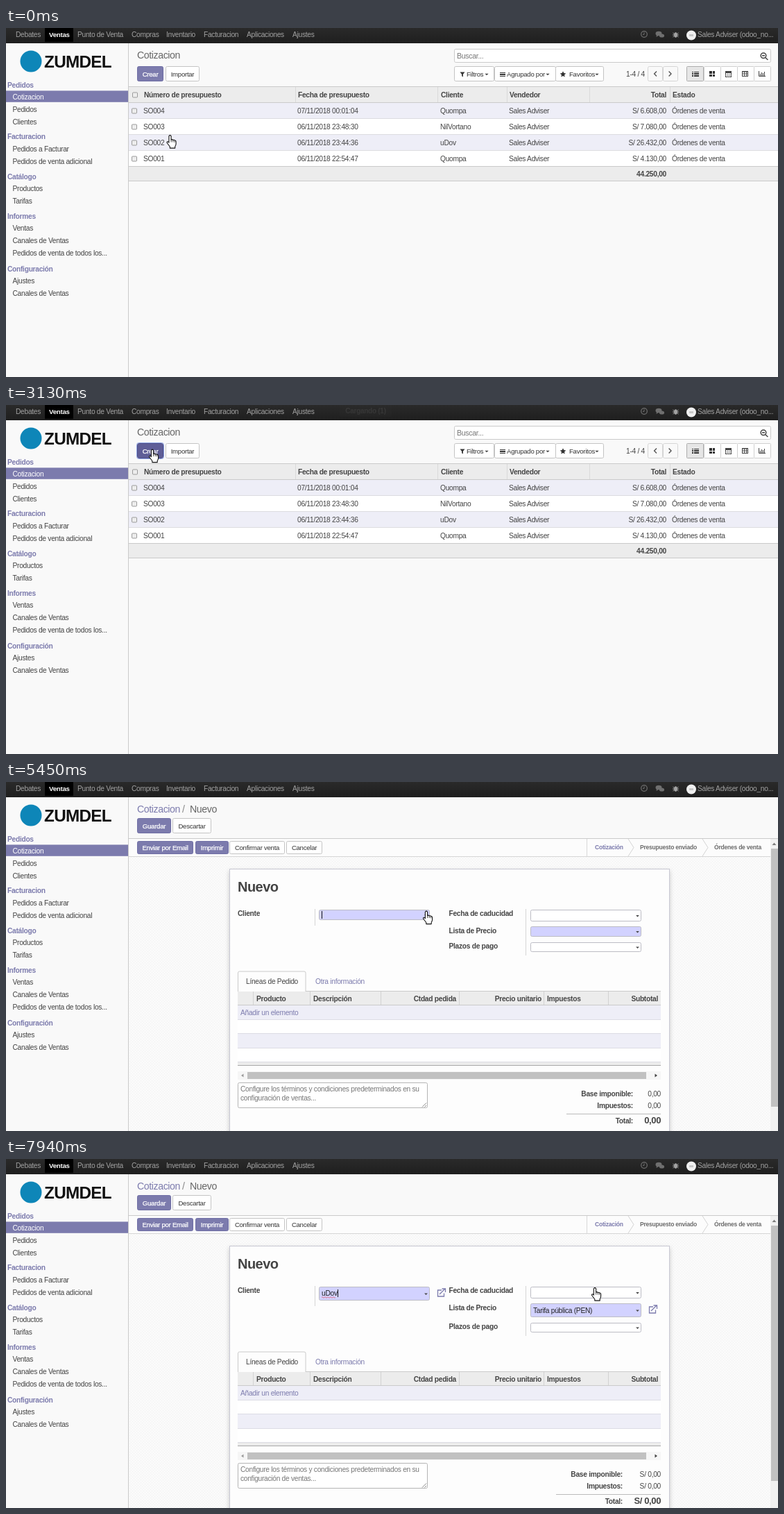
These frames come from a looping animation (1113x503 px, 8000 ms). An HTML page:

```html
<!DOCTYPE html>
<html lang="es">
<head>
<meta charset="utf-8">
<style>
html, body { margin: 0; width: 100%; height: 100%; overflow: hidden; background: #f9f9f9; }
svg { display: block; width: 1113px; height: 503px; font-family: "Liberation Sans", Arial, sans-serif; }
text { white-space: pre; letter-spacing: -.028em; }
rect { shape-rendering: crispEdges; }
.round { shape-rendering: auto; }
</style>
</head>
<body>
<svg id="stage" viewBox="0 0 1113 503" xmlns="http://www.w3.org/2000/svg"></svg>
<script>
const PURPLE = '#7c7bad', DARK = '#444', LINE = '#cacaca', STRIPE = '#eeeef7', FIELD = '#d2d2ff';
const LOOP = 8000;

// ---- drawing helpers; text is centred on y ----
const text = (x, y, s, o = {}) => {
  const size = (o.size || 9.7) * 1.055;
  return `<text x="${x}" y="${(y + size * .36).toFixed(2)}" font-size="${size.toFixed(2)}" fill="${o.fill || DARK}"` +
    (o.bold ? ' font-weight="700"' : '') + (o.end ? ' text-anchor="end"' : '') +
    (o.mid ? ' text-anchor="middle"' : '') + (o.attr ? ' ' + o.attr : '') + `>${s}</text>`;
};
const bold = (x, y, s, o = {}) => text(x, y, s, { ...o, bold: true });
const rect = (x, y, w, h, fill, attr = '') =>
  `<rect x="${x}" y="${y}" width="${w}" height="${h}" fill="${fill}" ${attr}/>`;
const box = (x, y, w, h, fill, stroke = LINE, r = 2, attr = '') =>
  `<rect class="round" x="${x + .5}" y="${y + .5}" width="${w - 1}" height="${h - 1}" rx="${r}" fill="${fill}" stroke="${stroke}" ${attr}/>`;
const path = (d, fill = 'none', stroke = 'none', attr = '') =>
  `<path d="${d}" fill="${fill}" stroke="${stroke}" ${attr}/>`;
const group = (id, inner) => `<g id="${id}">${inner}</g>`;
const down = (x, y, w = 2.6, fill = DARK) => path(`M${x - w} ${y - w / 2}h${2 * w}l${-w} ${w}z`, fill);

const button = (x, y, w, h, label, main, id = '') => {
  const look = main ? { fill: '#fff', attr: 'stroke="#fff" stroke-width=".25"' } : { fill: '#333' };
  return box(x, y, w, h, main ? PURPLE : '#fff', main ? '#6f6ea5' : '#c4c4c4', 2, id && `id="${id}"`) +
    text(x + w / 2, y + h / 2 + .5, label, { size: 9.1, mid: true, ...look });
};
const check = (x, y) => box(x - 4, y - 4, 8, 8, '#ededed', '#9a9a9a', 1);
const input = (y, h, fill = '#fff', x = 756) => box(x, y, 160, h, fill, '#bcbcc4', 2) + down(x + 154.5, y + h / 2 + .7, 2.4);
const link = (x, y) => path(`M${x + 1} ${y - 4}h-5.5v9h9v-4.5M${x - 2} ${y + 2}L${x + 6} ${y - 6}M${x + 1.5} ${y - 6}h5v5`, 'none', PURPLE, 'stroke-width="1.3"');

// ---- frame of the application ----
function navbar() {
  const items = [[14, 'Debates'], [103, 'Punto de Venta'], [181, 'Compras'], [231, 'Inventario'],
    [285, 'Facturacion'], [347, 'Aplicaciones'], [413, 'Ajustes']];
  const gray = '#a2a2a2', dim = '#6f6f6f';
  return rect(0, 0, 1113, 22, 'url(#bar)') + rect(56, 0, 41, 20, '#000') +
    items.map(([x, s]) => text(x, 9.8, s, { fill: gray })).join('') +
    bold(62, 9.8, 'Ventas', { fill: '#fff', size: 9.2 }) +
    `<circle cx="920" cy="9" r="4.3" fill="none" stroke="${dim}" stroke-width="1.2"/>` +
    path('M920 6.3V9.4H918', 'none', dim) +
    `<ellipse cx="941" cy="8" rx="4.5" ry="3.2" fill="${dim}"/><ellipse cx="945.5" cy="11" rx="3.6" ry="2.6" fill="${dim}"/>` +
    path('M938 10l-.5 3l3-2z', dim) +
    `<ellipse cx="965.5" cy="10" rx="2.4" ry="3.8" fill="${gray}"/>` +
    path('M961.5 7l8 6M969.5 7l-8 6M961 10h9', 'none', gray) +
    '<circle cx="988" cy="10.5" r="7" fill="#f0f0f0"/>' + rect(985, 9, 6, 3, '#c9c9c9') +
    text(997, 9.8, 'Sales Adviser (odoo_no...', { fill: gray }) +
    group('loading', box(481, -4, 75, 21, '#333', '#333', 2) +
      bold(518.5, 8, 'Cargando (1)', { size: 9.5, fill: '#999', mid: true }));
}

function sidebar() {
  const menu = [
    [82, 'Pedidos', [117, 'Pedidos'], [135, 'Clientes']],
    [156.5, 'Facturacion', [174.5, 'Pedidos a Facturar'], [192.5, 'Pedidos de venta adicional']],
    [214, 'Catálogo', [231, 'Productos'], [249, 'Tarifas']],
    [271.5, 'Informes', [288.5, 'Ventas'], [306.5, 'Canales de Ventas'], [324.5, 'Pedidos de venta de todos los...']],
    [347, 'Configuración', [364, 'Ajustes'], [382, 'Canales de Ventas']]
  ];
  return rect(0, 22, 177, 481, '#f9f9f9') + rect(176, 22, 1, 481, LINE) +
    '<circle cx="36" cy="48" r="15.5" fill="#0e86b8"/>' +
    bold(55, 48.2, 'ZUMDEL', { size: 23, fill: '#111' }) +
    rect(0, 90.4, 176, 16.4, PURPLE, 'class="round"') + text(9.5, 99, 'Cotizacion', { fill: '#fff' }) +
    menu.map(([y, head, ...items]) => bold(2, y, head, { fill: PURPLE }) +
      items.map(([iy, s]) => text(9.5, iy, s)).join('')).join('');
}

// ---- list of quotations ----
function listView() {
  const rows = [
    ['SO004', '07/11/2018 00:01:04', 'Quompa', '6.608,00'],
    ['SO003', '06/11/2018 23:48:30', 'NilVortano', '7.080,00'],
    ['SO002', '06/11/2018 23:44:36', 'uDov', '26.432,00'],
    ['SO001', '06/11/2018 22:54:47', 'Quompa', '4.130,00']
  ];
  const heads = [[199, 'Número de presupuesto'], [421, 'Fecha de presupuesto'], [627, 'Cliente'], [726, 'Vendedor'], [961, 'Estado']];
  let s = rect(177, 22, 936, 481, '#f9f9f9') + text(189, 39, 'Cotizacion', { size: 13.4, fill: '#666' }) +
    button(189, 55, 38, 22, 'Crear', true, 'create') + button(230, 55, 49, 22, 'Importar') +
    box(188, 54, 40, 24, 'none', '#8fa6e6', 3, 'id="ring"');
  // search and filters
  s += box(646, 30, 457, 20, '#fff') + text(650, 40.3, 'Buscar...', { fill: '#777', size: 10 }) +
    '<circle cx="1092" cy="39.8" r="3.8" fill="none" stroke="#444" stroke-width="1.5"/>' +
    path('M1095 42.8l3.4 3.2M1090 39.8h4', 'none', '#444', 'stroke-width="1.5"');
  s += [[646, 58], [704, 89], [792, 70]].map(([x, w]) => box(x, 55, w, 22, '#fff', '#c4c4c4')).join('') +
    path('M654.5 63.5h7l-2.6 3.3v3.7l-1.8-1.2v-2.5z', '#333') +
    [63.5, 66, 68.5].map(y => rect(712, y, 8, 1.5, '#333')).join('') +
    path('M803 62.2l1.3 2.9l3 .3l-2.3 2.1l.7 3.1l-2.7-1.6l-2.7 1.6l.7-3.1l-2.3-2.1l3-.3z', '#333') +
    [[664, 'Filtros', 693], [722, 'Agrupado por', 781], [812, 'Favoritos', 852]].map(([x, t, c]) =>
      text(x, 66.7, t, { size: 9.1, fill: '#333' }) + down(c, 67)).join('');
  s += text(894, 66.3, '1-4 / 4') + [925, 947].map(x => box(x, 55, 22, 22, '#f9f9f9', '#d5d5d5')).join('') +
    path('M938 62.5l-3.4 3.5l3.4 3.5M955.6 62.5l3.4 3.5l-3.4 3.5', 'none', '#555', 'stroke-width="1.4"');
  s += [981, 1006, 1030, 1054, 1078].map((x, i) => box(x, 55, 25, 22, i ? '#fff' : '#e6e6e6', i ? '#cfcfcf' : '#adadad', 1)).join('') +
    [62.5, 65.3, 68.1].map(y => rect(989, y, 2, 1.6, '#333') + rect(992, y, 7, 1.6, '#333')).join('') +
    [[1014, 62], [1018.5, 62], [1014, 66.5], [1018.5, 66.5]].map(([x, y]) => rect(x, y, 3.6, 3.6, '#333')).join('') +
    box(1037, 62, 9, 9, 'none', '#444', 0) + rect(1037, 62, 9, 3, '#444') + path('M1040.5 65v6M1043 65v6M1037 68h9', 'none', '#999', 'stroke-width=".8"') +
    box(1061, 62, 9, 8, 'none', '#444', 0) + path('M1064.5 62v8M1067.5 62v8M1061 66h9M1061 63h9', 'none', '#444', 'stroke-width=".9"') +
    path('M1085.5 62v7.5h9.5', 'none', '#444') + [[1087, 3], [1089, 5], [1091, 4], [1093, 6.5]].map(([x, h]) => rect(x, 69 - h, 1.3, h, '#444')).join('');
  // table
  s += rect(177, 84, 936, 1, LINE) + rect(177, 85, 936, 23, '#ececec') + rect(177, 107, 936, 1, LINE) +
    [417, 622, 722, 841, 957].map(x => rect(x, 85, 1, 22, '#d9d9d9')).join('') +
    check(186, 96.5) + heads.map(([x, h]) => bold(x, 96.1, h)).join('') + bold(952, 96.1, 'Total', { end: true });
  rows.forEach(([num, date, client, total], i) => {
    const y = 108 + 23 * i, c = y + 11;
    s += rect(177, y, 936, 23, i % 2 ? '#fff' : STRIPE) + rect(177, y + 22, 936, 1, '#dcdce0') + check(185, c + .5) +
      [[198, num], [420, date], [626, client], [725, 'Sales Adviser'], [960, 'Órdenes de venta']].map(([x, t]) => text(x, c, t)).join('') +
      text(952, c, 'S/ ' + total, { end: true });
  });
  return s + rect(177, 200, 936, 20, '#ececec') + rect(177, 199, 936, 1, LINE) + rect(177, 220, 936, 1, LINE) +
    bold(952, 210, '44.250,00', { end: true });
}

// ---- new quotation form ----
function fields(id, after) {
  const grow = after ? 5 : 0;
  return group(id,
    rect(445, 183, 1, 24 + grow, '#d5d5d5') + rect(749, 183, 1, 67 + grow, '#d5d5d5') +
    input(184, 15 + grow, FIELD, 451) + input(184, 17) + input(208, 15 + grow, FIELD) + input(231 + grow, 14) +
    bold(638.5, 236.5 + grow, 'Plazos de pago') +
    (after ? text(760, 218, 'Tarifa pública (PEN)', { fill: '#222' }) + link(627, 193) + link(932, 217) : ''));
}

function totals(id, currency) {
  const x = currency ? 889 : 904, c = currency ? 'S/ ' : '';
  return group(id, [[449.5, 'Base imponible:'], [466.8, 'Impuestos:'], [488, 'Total:']].map(([y, s]) => bold(x, y, s, { end: true })).join('') +
    text(944, 449.5, c + '0,00', { end: true }) + text(944, 466.8, c + '0,00', { end: true }) +
    rect(currency ? 793 : 808, 478, currency ? 151 : 136, 1, '#bbb') +
    bold(944, 487.5, c + '0,00', { end: true, size: 12.3 }));
}

function formView() {
  let s = rect(177, 22, 936, 60, '#f9f9f9') + rect(177, 81, 936, 1, LINE) + rect(177, 82, 925, 26, '#fcfcfc') +
    rect(177, 108, 925, 395, '#fafafa') + rect(177, 108, 925, 395, 'url(#dots)') + rect(177, 107, 925, 1, '#d6d6d6');
  s += text(189, 39, 'Cotizacion', { size: 13.4, fill: PURPLE }) + text(254, 39, '/', { size: 13.4, fill: '#888' }) +
    text(265, 39, 'Nuevo', { size: 13.4, fill: '#666' }) +
    button(189, 52, 49, 22, 'Guardar', true) + button(240, 52, 56, 22, 'Descartar') +
    button(189, 85, 81, 19, 'Enviar por Email', true) + button(273, 85, 48, 19, 'Imprimir', true) +
    button(322, 85, 80, 19, 'Confirmar venta') + button(404, 85, 52, 19, 'Cancelar');
  s += rect(837, 82, 1, 25, '#d9d9d9') +
    [897, 1004].map(x => path(`M${x} 82l8 12.5l-8 12.5`, 'none', '#d4d4d4')).join('') +
    [[849, 'Cotización', PURPLE], [914, 'Presupuesto enviado'], [1021, 'Órdenes de venta']].map(([x, t, fill]) =>
      bold(x, 94.3, t, { size: 8.1, fill: fill || '#6b6b6b' })).join('');
  // sheet
  s += rect(322, 125, 635, 400, '#fff', 'filter="url(#soft)"') + box(322, 125, 635, 400, '#fdfdfd', '#c8c8d3', 0) +
    bold(334, 150.3, 'Nuevo', { size: 19 }) + bold(334, 189.5, 'Cliente') +
    bold(638.5, 189.5, 'Fecha de caducidad') + bold(638.5, 214.5, 'Lista de Precio') +
    fields('before', false) + fields('after', true);
  s += group('client', text(455, 191.5, 'uDov', { fill: '#222' }) +
    path('M455 197.5' + 'q1-1.6 2 0t2 0'.repeat(5), 'none', '#e0566a', 'stroke-width=".8"')) +
    rect(455, 186, 1, 11, '#111', 'id="caret"');
  // lower half moves as one block
  let low = rect(334, 301, 610, 1, LINE) + path('M334.5 302V275q0-2 2-2h93.5q2 0 2 2V302', '#fdfdfd', LINE) +
    text(346, 287, 'Líneas de Pedido') + text(446, 287, 'Otra información', { fill: PURPLE }) +
    rect(334, 302, 610, 20, '#ececec') + rect(334, 321, 610, 1, LINE) +
    [356, 438, 540, 653, 775, 868].map(x => rect(x, 302, 1, 19, '#d2d2d2')).join('') +
    [[361, 'Producto'], [443, 'Descripción'], [780, 'Impuestos']].map(([x, t]) => bold(x, 312, t)).join('') +
    [[649, 'Ctdad pedida'], [772, 'Precio unitario'], [940, 'Subtotal']].map(([x, t]) => bold(x, 312, t, { end: true })).join('');
  [322, 342.5, 363, 383.5].forEach((y, i) => {
    low += rect(334, y, 610, 20.5, i % 2 ? '#fff' : STRIPE) + rect(334, Math.floor(y + 20), 610, 1, '#dcdce4');
  });
  low += text(338, 332.5, 'Añadir un elemento', { fill: PURPLE }) +
    rect(334, 404, 610, 4, '#ececec') + rect(334, 408, 610, 1, '#a8a8a8') +
    rect(334, 417, 610, 12, '#f6f6f6') + rect(348, 418, 575, 10, '#c1c1c1') +
    path('M342.5 420.5v5l-3.5-2.5z', '#9a9a9a') + path('M935.5 420.5v5l3.5-2.5z', '#444') +
    box(334, 433, 274, 37, '#fff', '#b5b5b5') +
    text(338, 442.5, 'Configure los términos y condiciones predeterminados en su', { fill: '#777' }) +
    text(338, 455.5, 'configuración de ventas...', { fill: '#777' }) +
    path('M600 468.5l6-6M603.5 468.5l2.5-2.5', 'none', '#777', 'stroke-width=".9"') +
    totals('plain', false) + totals('money', true);
  s += group('low', low);
  // client choices
  s += group('drop', rect(452, 203, 159, 93, '#fff', 'filter="url(#soft)"') + box(451, 202, 160, 94, '#fff', '#d3d3d3', 0) +
    rect(452, 203, 158, 17.6, PURPLE, 'id="pick"') +
    ['NilVortano', 'Quompa', 'Cliente', 'uDov'].map((t, i) =>
      text(467, 211.5 + 17.6 * i, t, { attr: 'class="choice"' })).join('') +
    text(482, 282, 'Crear y editar...', { fill: PURPLE }));
  // page scrollbar
  return s + rect(1102, 82, 11, 421, '#f1f1f1') + path('M1104.5 91h6l-3-3.5z', '#7d7d7d') +
    rect(1103, 96, 10, 372, '#c1c1c1', 'id="thumb"');
}

const hand = 'M-1.6 1.2Q0-1 1.6 1.2V6.5Q3.2 5.6 4.2 7Q6 6.2 6.8 7.6Q8.4 7.2 8.6 9.2V12.5Q8.4 15 7.2 16.2V18.6H-.2V16.5L-4.4 11Q-4.6 8.8-2.8 9.4L-1.6 10.6Z';
const arrow = 'M0 0V14L3.3 11L5.4 16L7.6 15L5.5 10.3H10Z';

document.getElementById('stage').innerHTML =
  `<defs>
    <linearGradient id="bar" x2="0" y2="1"><stop offset="0" stop-color="#2a2a2a"/><stop offset="1" stop-color="#1f1f1f"/></linearGradient>
    <pattern id="dots" width="4" height="4" patternUnits="userSpaceOnUse"><path d="M0 0h1v1h-1zM2 2h1v1h-1z" fill="#f1f1f1"/></pattern>
    <filter id="soft" x="-10%" y="-10%" width="120%" height="125%"><feDropShadow dx="0" dy="3" stdDeviation="3" flood-opacity=".2"/></filter>
  </defs>` +
  group('list', listView()) + group('form', formView()) + navbar() + sidebar() +
  group('cursor', path(hand, '#fff', '#111', 'id="hand" stroke-linejoin="round" stroke-width="1.1"') +
    path('M1.7 6.5V10M4.3 7.2V10M6.6 8V10.3', 'none', '#111', 'id="knuckles" stroke-width=".8"') +
    path(arrow, '#fff', '#111', 'id="arrow" stroke-width=".9"'));

// ---- motion ----
const $ = id => document.getElementById(id);
const choices = [...document.querySelectorAll('.choice')];
const show = (id, on) => $(id).style.display = on ? '' : 'none';

// each move: first step, last step, number of steps, end point, optional bend
const START = [236.5, 154.5];
const MOVES = [
  { a: 120, b: 890, n: 7, to: [211, 64], bend: [375, 120] },
  { a: 3970, b: 4490, n: 5, to: [370, 161] },
  { a: 4770, b: 5450, n: 6, to: [606, 186] },
  { a: 5850, b: 6430, n: 5, to: [603, 196.5] },
  { a: 6560, b: 6850, n: 3, to: [525, 260] },
  { a: 7010, b: 7010, n: 1, to: [523, 262.5] },
  { a: 7290, b: 7940, n: 6, to: [849, 185.5] }
];
const LOADING = [[2320, .25], [2470, .6], [2850, .5], [2990, .35], [3130, .15], [3410, 0],
  [5850, .25], [5990, .6], [6280, .45], [6420, .25], [6560, 0], [7420, .25], [7560, .5], [7700, .25], [7830, 0]];
const CARET = [[3410, 3970], [4490, 4990], [5440, 5990], [6560, 7010], [7290, LOOP]];

function pointer(t) {
  let p = START;
  for (const { a, b, n, to, bend } of MOVES) {
    if (t < a) break;
    const k = b > a ? Math.min(n, Math.floor((t - a) * (n - 1) / (b - a) + .001) + 1) : n;
    const u = k / n, e = u * u * (3 - 2 * u);
    const mid = bend || [(p[0] + to[0]) / 2, (p[1] + to[1]) / 2];
    p = p.map((v, i) => (1 - e) * (1 - e) * v + 2 * e * (1 - e) * mid[i] + e * e * to[i]);
  }
  return p;
}

function draw(t) {
  const form = t >= 3410, chosen = t >= 7290, priced = t >= 7560, pressed = t >= 1800;
  show('list', !form);
  show('form', form);
  const create = $('create');
  create.setAttribute('fill', pressed ? '#5f5e97' : t >= 890 ? '#68679f' : PURPLE);
  create.setAttribute('stroke', pressed ? '#504f88' : '#6f6ea5');
  show('ring', pressed);

  show('before', !priced);
  show('after', priced);
  show('plain', !priced);
  show('money', priced);
  const shift = priced ? 5 : 0;
  $('low').setAttribute('transform', `translate(0 ${shift})`);
  $('thumb').setAttribute('height', priced ? 368 : 372);
  $('client').setAttribute('transform', `translate(0 ${priced ? 2 : 0})`);
  show('client', chosen);
  show('caret', CARET.some(([a, b]) => t >= a && t < b));
  $('caret').setAttribute('x', chosen ? 478 : 455);
  $('caret').setAttribute('y', priced ? 188 : 186);

  const [x, y] = pointer(t);
  show('drop', t >= 5990 && !chosen);
  const row = Math.max(0, Math.min(3, Math.floor((y - 202.5) / 17.6)));
  $('pick').setAttribute('y', 203 + 17.6 * row);
  choices.forEach((c, i) => c.setAttribute('fill', i === row ? '#fff' : DARK));

  let alpha = 0;
  for (const [at, v] of LOADING) if (t >= at) alpha = v;
  $('loading').setAttribute('opacity', alpha);

  const plain = t >= 3970 && t < 5180;
  show('arrow', plain);
  show('hand', !plain);
  show('knuckles', !plain);
  $('cursor').setAttribute('transform', `translate(${x.toFixed(2)} ${y.toFixed(2)})`);
}

const begin = performance.now();
function tick() {
  draw((performance.now() - begin) % LOOP);
  requestAnimationFrame(tick);
}
draw(0);
requestAnimationFrame(tick);
</script>
</body>
</html>
```
